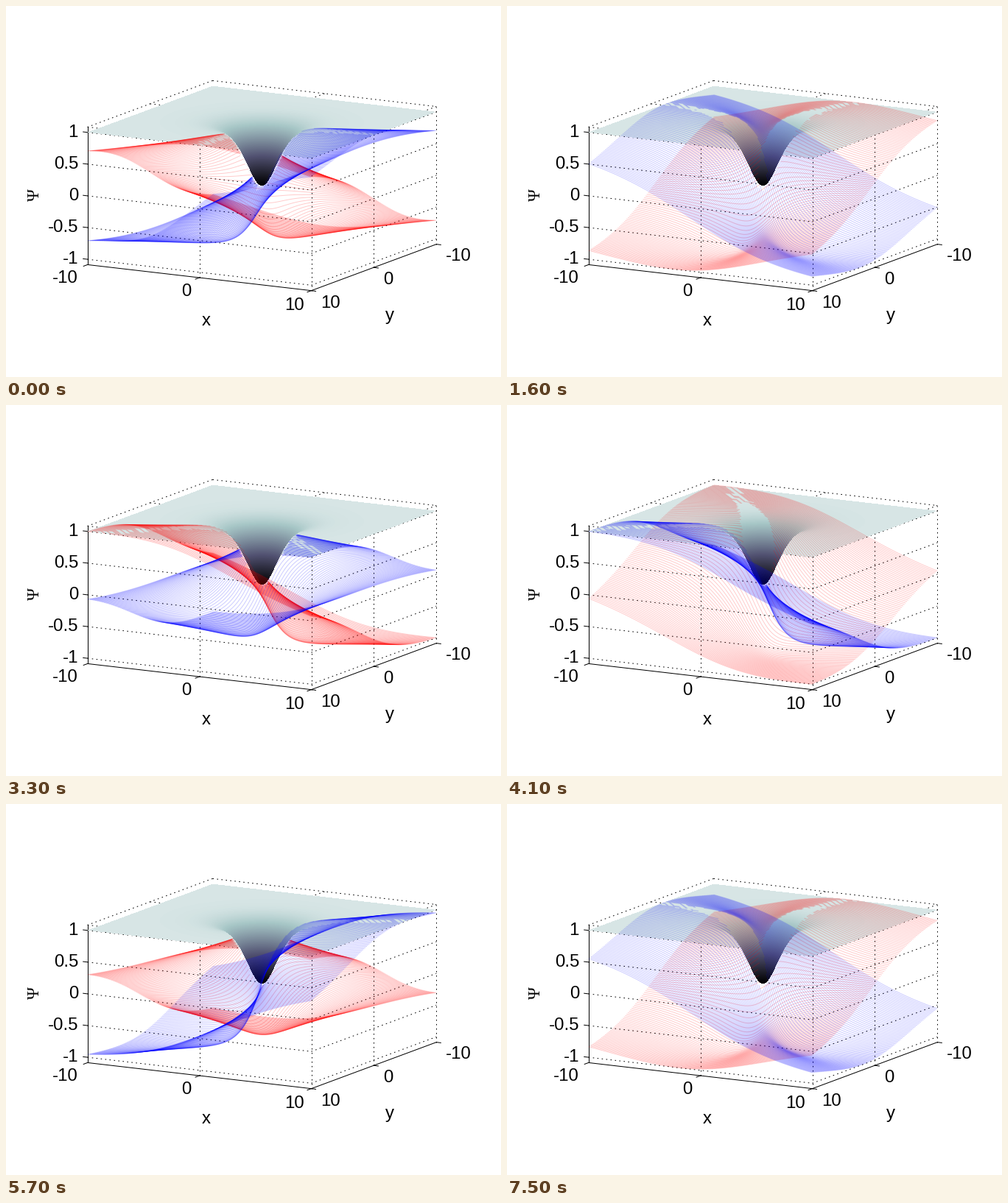
A matplotlib script for the animation above (7.6 s loop, 672 by 504 pixels).

```python
import numpy as np
import matplotlib.pyplot as plt
from matplotlib.animation import FuncAnimation
from matplotlib.collections import LineCollection

W, H, DPI = 672, 504, 100
PX = 72 / DPI                      # one pixel in points
FRAMES, INTERVAL = 76, 100
STEP = np.radians(-12.15)          # phase advance per frame

# Orthographic view, seen slightly from below
CX, CY = 347.5, 244.0
SCALE, DEPTH, ZPX = 17.4, 3.61, 86.2
COS, SIN = np.cos(np.radians(29.2)), np.sin(np.radians(29.2))
R, ZMAX = 10, 1.085


def density(r):
    """Pade form of the vortex density |psi|^2."""
    q = r ** 2
    a, b = 11 / 32, 11 / 384
    return q * (a + b * q) / (1 + q / 3 + b * q ** 2)


def project(x, y, z):
    u = x * COS - y * SIN
    s = x * SIN + y * COS
    return CX + SCALE * u, CY + DEPTH * s - ZPX * z


def nearest_depth():
    """Depth of the first density surface point behind every pixel."""
    s = np.linspace(-14.3, 14.3, 2400)
    rows = np.arange(H) + 0.5
    hit = np.full((H, W), np.nan)
    for col in range(W):
        u = (col + 0.5 - CX) / SCALE
        x, y = u * COS + s * SIN, s * COS - u * SIN
        inside = (abs(x) <= R) & (abs(y) <= R)
        if inside.sum() < 2:
            continue
        si = s[inside]
        sy = CY + DEPTH * si - ZPX * density(np.hypot(u, si))
        hit[:, col] = np.interp(rows, np.maximum.accumulate(sy), si,
                                left=np.nan, right=np.nan)
    return hit


fig = plt.figure(figsize=(W / DPI, H / DPI), dpi=DPI, facecolor="white")
ax = fig.add_axes([0, 0, 1, 1])
ax.set_xlim(0, W)
ax.set_ylim(H, 0)
ax.axis("off")


def line3(a, b, dotted=True):
    (x0, y0), (x1, y1) = project(*a), project(*b)
    style = (0, (1.6, 4.4)) if dotted else "-"
    ax.plot([x0, x1], [y0, y1], color="black", lw=PX, ls=style,
            dash_capstyle="butt", solid_capstyle="butt", zorder=1)


def tick(point, dx, dy):
    x, y = project(*point)
    ax.plot([x, x + dx], [y, y + dy], color="black", lw=PX, zorder=1)


def label(x, y, text, ha="center", size=24, family="Liberation Sans", rotation=0):
    ax.text(x, y, text, ha=ha, va="center", fontsize=size * PX,
            family=family, rotation=rotation)


# Grid on the far walls and the top
for t in (-R, 0, R):
    line3((t, -R, ZMAX), (t, R, ZMAX))
    line3((-R, t, ZMAX), (R, t, ZMAX))
    if t > -R:
        line3((t, R, -ZMAX), (t, R, ZMAX))
    if t < R:
        line3((R, t, -ZMAX), (R, t, ZMAX))
    tick((t, R, -ZMAX), -5.5, 2)
    tick((R, t, -ZMAX), 6, 0.8)
for z in (-1, -0.5, 0, 0.5, 1):
    line3((-R, R, z), (R, R, z))
    line3((R, R, z), (R, -R, z))
    tick((-R, R, z), -6, -0.7)
    label(98, project(-R, R, z)[1], f"{z:g}", "right")

# Solid axes
line3((-R, R, -ZMAX), (-R, R, ZMAX), False)
line3((-R, R, -ZMAX), (R, R, -ZMAX), False)
line3((R, R, -ZMAX), (R, -R, -ZMAX), False)

label(98, 370.5, "-10", "right")
label(245, 388, "0")
label(391, 407, "10")
label(440.5, 403.5, "10")
label(518.5, 371.5, "0")
label(614, 340.5, "-10")
label(272, 428, "x")
label(521, 421.5, "y")
label(39.5, 257, "Ψ", size=23, family="Liberation Serif", rotation=90)

# Density surface
hit = nearest_depth()
lateral = (np.arange(W) + 0.5 - CX) / SCALE
rho = density(np.hypot(lateral[None, :], np.nan_to_num(hit)))
shade = plt.get_cmap("bone")(0.885 * rho)
shade[..., 3] = np.isfinite(hit)
ax.imshow(shade, extent=(0, W, H, 0), interpolation="nearest",
          aspect="auto", zorder=2)

# Real and imaginary parts as rows of thin translucent lines
axis = np.linspace(-R, R, 100)
X, Y = np.meshgrid(axis, axis)
AMP = np.sqrt(density(np.hypot(X, Y)))
THETA = np.arctan2(Y, X)
S = X * SIN + Y * COS


def sheet(color, z):
    lines = LineCollection([], colors=color, alpha=0.2, linewidths=PX, zorder=z)
    ax.add_collection(lines, autolim=False)
    return lines


red, blue = sheet((1, 0, 0), 3), sheet((0, 0, 1), 4)


def rows_of(z):
    """Rows of constant y, broken where the density surface hides them."""
    sx, sy = project(X, Y, z)
    front = hit[sy.astype(int), sx.astype(int)]
    pts = np.dstack([sx, sy])
    pts[S > front + 0.05] = np.nan
    return list(pts)


def draw(i):
    phase = THETA + i * STEP
    blue.set_segments(rows_of(AMP * np.cos(phase)))
    red.set_segments(rows_of(AMP * np.sin(phase)))
    return red, blue


anim = FuncAnimation(fig, draw, frames=FRAMES, interval=INTERVAL,
                     repeat=True, repeat_delay=0, cache_frame_data=False)
plt.show()
```
